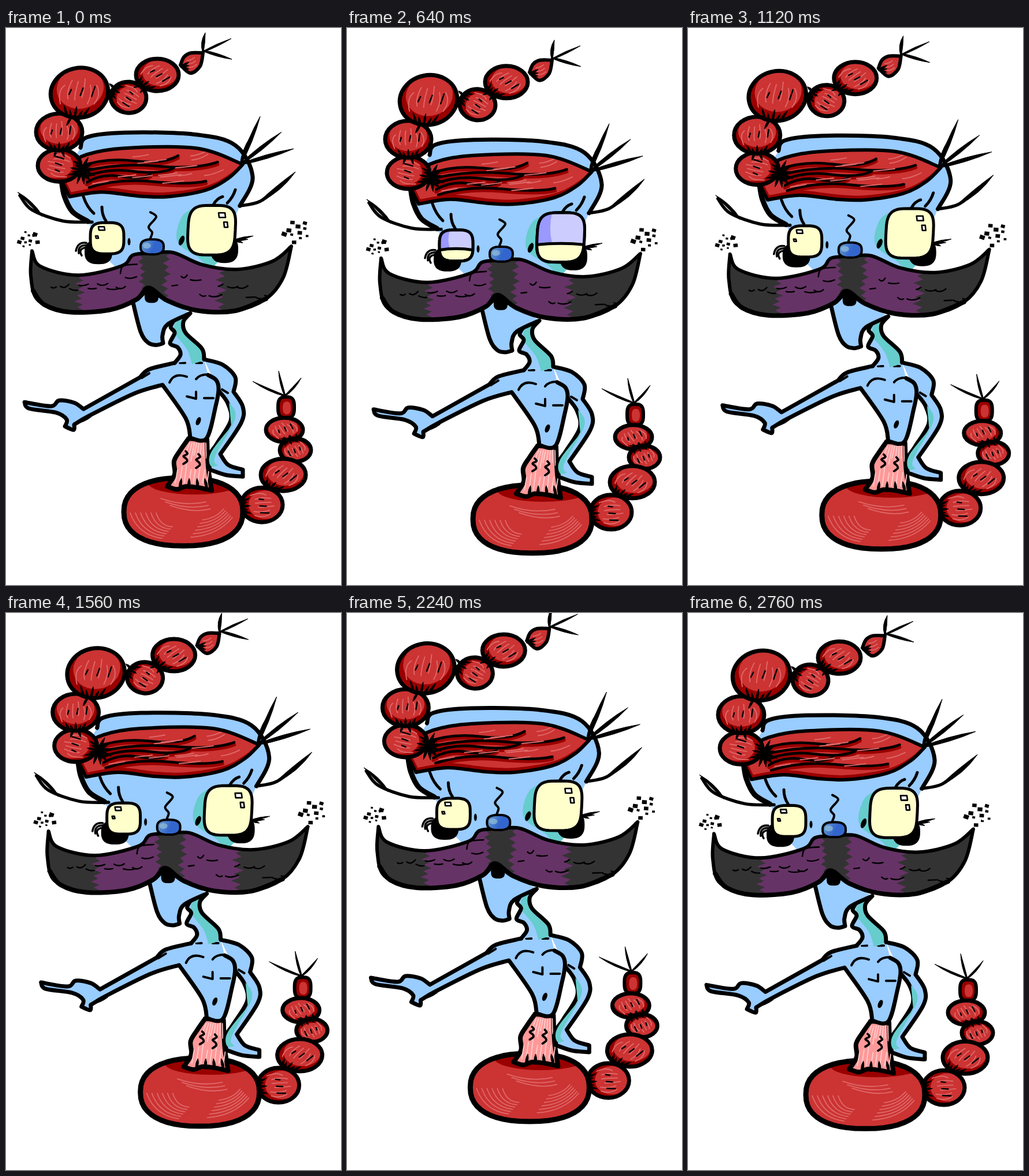
An HTML page that plays this animation: 580x965 px, repeating every 2.8 s.

```html
<!DOCTYPE html>
<html lang="en">
<head>
<meta charset="utf-8">
<title>Floating moustache</title>
<style>
html, body { margin: 0; width: 100%; height: 100%; overflow: hidden; background: #fff; }
svg { display: block; width: 580px; height: 965px; }
</style>
</head>
<body>
<svg viewBox="0 0 580 965">
  <defs id="defs">
    <linearGradient id="noseFill" x1="0" x2="1" y1="0" y2=".3">
      <stop offset=".1" stop-color="#6699cc"/><stop offset=".65" stop-color="#3366cc"/>
    </linearGradient>
  </defs>
  <g id="all"></g>
</svg>
<script>
const NS = "http://www.w3.org/2000/svg";
const all = document.getElementById("all"), defs = document.getElementById("defs");
let layer = all;

const RED = "#cc3333", DARK = "#990000", GLOSS = "#df6868", SKY = "#99ccff",
      TEAL = "#66cccc", CREAM = "#ffffcc", PLUM = "#663366", COAL = "#333333";

let seed = 7;
const rand = (lo, hi) => lo + (hi - lo) * ((seed = seed * 16807 % 2147483647) / 2147483647);
const times = (n, fn) => { for (let i = 0; i < n; i++) fn(i, n > 1 ? i / (n - 1) : 0); };

function node(name, attrs, parent = layer) {
  const n = document.createElementNS(NS, name);
  for (const k in attrs) n.setAttribute(k, attrs[k]);
  return parent.appendChild(n);
}

function group(attrs, fn) {
  const up = layer, g = layer = node("g", attrs);
  fn();
  layer = up;
  return g;
}

function clipTo(d, id, fn) {
  node("path", { d }, node("clipPath", { id }, defs));
  group({ "clip-path": `url(#${id})` }, fn);
}

// Spline through points; "/" makes a corner at the point before it.
function spline(text) {
  let d = "", last = null;
  for (const part of text.split("/")) {
    const p = part.trim().split(/\s+/).map(s => s.split(",").map(Number));
    if (last) p.unshift(last); else d = "M" + p[0];
    for (let i = 0; i < p.length - 1; i++) {
      const a = p[i - 1] || p[i], b = p[i], c = p[i + 1], e = p[i + 2] || c;
      d += `C${b[0] + (c[0] - a[0]) / 6},${b[1] + (c[1] - a[1]) / 6} ` +
           `${c[0] - (e[0] - b[0]) / 6},${c[1] - (e[1] - b[1]) / 6} ${c}`;
    }
    last = p[p.length - 1];
  }
  return d;
}

// Rounded box between an ellipse (n = 2) and a rectangle.
function blob(cx, cy, rx, ry, n, lean = 0) {
  const p = [], pow = v => Math.sign(v) * Math.abs(v) ** (2 / n);
  times(48, i => {
    const a = i * Math.PI / 24, y = ry * pow(Math.sin(a));
    p.push([cx + rx * pow(Math.cos(a)) - lean * y, cy + y]);
  });
  return "M" + p.join("L") + "Z";
}

function path(d, fill, width = 0, stroke = "#000") {
  return node("path", { d, fill, stroke, "stroke-width": width,
    "stroke-linecap": "round", "stroke-linejoin": "round" });
}
const shape = (text, fill, width) => path(spline(text), fill, width);
const line = (text, width = 4, color) => path(spline(text), "none", width, color);

function spike(x0, y0, x1, y1, w, bend = 0) {
  const l = Math.hypot(x1 - x0, y1 - y0), nx = (y1 - y0) / l, ny = (x0 - x1) / l;
  const mid = k => [(x0 + x1) / 2 + nx * k, (y0 + y1) / 2 + ny * k];
  path(`M${x0 + nx},${y0 + ny}Q${mid(bend + w)} ${x1},${y1}Q${mid(bend - w)} ${x0 - nx},${y0 - ny}Z`, "#000", 1);
}

function squiggle(x, y, h, amp) {
  const p = [];
  times(6, (i, u) => p.push(`${x + amp * Math.sin(i * 2.2)},${y + h * u}`));
  line(p.join(" "), 3.8);
}

// A bead drawn on the unit disk: a runs toward the knot, b across it.
function bead(cx, cy, rx, ry, knot, tilt = 0) {
  const c = Math.cos(knot * Math.PI / 180), s = Math.sin(knot * Math.PI / 180);
  const at = (a, b) => [rx * (a * c - b * s), ry * (a * s + b * c)];
  group({ transform: `translate(${cx} ${cy}) rotate(${tilt})` }, () => {
    node("ellipse", { rx, ry, fill: DARK });
    const [ox, oy] = at(-.18, 0);
    node("ellipse", { cx: ox, cy: oy, rx: rx * .82, ry: ry * .82, fill: RED });
    times(6, (i, u) => {
      const b = u * 1.3 - .65, far = -.62 + Math.abs(b) * .4 + (i % 2) * .12;
      path(`M${at(far, b * .85)}Q${at(0, b * 1.2)} ${at(far + .75, b * .9)}`, "none", 1.9, GLOSS);
    });
    times(3, i => path(`M${at(-.3 + i * .1, i * .4 - .5)}L${at(.1, i * .4 - .45)}`, "none", 2.4));
    node("ellipse", { rx, ry, fill: "none", stroke: "#000", "stroke-width": 7 });
    times(5, (i, u) => {
      const b = u - .5;
      spike(...at(1, b * .5), ...at(.55 + .15 * (i % 2), b * .9), 3);
      if (i % 2) spike(...at(1, b * .5), ...at(1.35, b * .9), 3);
    });
  });
}

function tail() {
  path(blob(485, 657, 14, 18, 3), DARK, 6);
  path(blob(486, 658, 7, 11, 2.5), RED);
  bead(482, 696, 32, 21, 65);
  bead(501, 731, 27, 20, -115);
  bead(480, 774, 39, 28, 125);
  bead(443, 826, 36, 30, 175);
  for (const [x, y, bend] of [[472, 594, 2], [427, 612, 3], [511, 606, -3]]) spike(483, 637, x, y, 3, bend);
}

function base() {
  const body = blob(307, 838, 103, 59, 2.35);
  path(body, RED);
  clipTo(body, "baseClip", () => {
    node("ellipse", { cx: 326, cy: 788, rx: 80, ry: 20, fill: DARK });
    times(6, (i, u) => {
      const r = 92 - 9 * i, top = 815 + 6 * i;
      path(`M${307 - r},${840}q${r * .15},${38 - i * 3} ${r * .6},${44 - i * 4}`, "none", 1.8, GLOSS);
      path(`M${320 + i * 4},${882 - i * 6}q${r * .5},-3 ${r * .78},${-34 + i * 3}`, "none", 1.8, GLOSS);
      if (i < 3) path(`M${268 + i * 8},${top}q40,14 ${78 - i * 4},6`, "none", 1.8, GLOSS);
    });
  });
  path(body, "none", 9);
}

function waist() {
  shape("316,711 / 348,713 / 350,760 356,801 / 333,796 311,794 296,799 279,794 / 292,773 291,750 302,731 316,711", "#ff9999", 8);
  times(8, (i, u) => {
    const x = 318 + 28 * u, foot = 293 + 55 * u;
    path(`M${x},719L${x + (foot - x) * .35},${740 + i % 3 * 5}`, "none", 1.8, "#ffcccc");
    path(`M${foot + 4},${765 - i % 3 * 5}L${foot},788`, "none", 1.8, "#ffcccc");
    if (i % 2) spike(foot, 798, foot + 4 - 8 * u, 780, 4);
  });
  squiggle(311, 733, 22, 4);
  squiggle(333, 738, 24, 4);
}

function torso() {
  shape("343,574 375,583 397,605 394,630 / 410,656 407,684 371,738 / 385,757 410,765 / 410,777 / 380,774 353,765 / 351,742 365,720 389,680 384,650 368,628", SKY, 7);
  shape("386,648 397,676 362,742 367,758 / 354,758 355,735 390,690", TEAL);

  const front = "292,580 248,591 232,605 / 134,660 / 118,649 92,645 78,655 32,648 / 40,659 86,666 105,678 102,690 / 117,696 118,687 / 145,671 222,633 271,618 / 311,676 319,710 / 347,711 363,655 368,626 364,610 350,601";
  shape(front + " / 343,574", SKY);
  line(front, 7);
  for (const d of ["M248,598l-13,8", "M118,685q16,-3 28,-12", "M283,614q8,-18 30,-10", "M329,608q6,-8 20,-8",
    "M313,638l16,4v-12", "M343,641h16", "M301,580h9", "M329,580h10", "M374,626l10,6"]) path(d, "none", 4);
  path(blob(333, 681, 3, 6, 2, .3), "#000", 2);
}

function neck() {
  const left = "292,580 302,566 297,553 284,546 292,528 285,518 291,506 /", right = "318,495 307,509 311,528 339,555 343,574";
  shape(left + right, SKY);
  shape("292,512 307,503 309,527 336,556 341,574 322,582 / 313,556 290,528", TEAL);
  line(left.slice(0, -2), 7);
  line(right, 7);
}

function head() {
  const rim = "129,207 140,189 205,181 325,184 397,203 427,258 405,308";
  shape("129,207 140,189 205,181 325,184 397,203 427,258 405,308 / 353,424 / 230,438 180,405 / 142,336 / 115,318 96,264", SKY);
  line(rim, 7);
  line("96,264 101,291 115,318 142,335", 9);
  shape("335,308 305,326 297,370 337,401 350,424 / 367,405", TEAL);

  const soup = spline("96,264 105,240 140,219 205,208 330,208 410,236 / 385,260 345,281 280,292 230,291 165,284 110,292 / 96,264");
  path(soup, DARK);
  clipTo(soup, "soupClip", () => {
    group({ transform: "translate(3 -8)" }, () => path(soup, RED));
    times(5, i => {
      const x = 128 + i * 4, y = 232 + i * 9, w = 170 + 65 * Math.sin(i * 1.7);
      const wave = `M${x},${y + 8}q${w * .25},-16 ${w * .55},-10t${w * .45},${-9 + i * 2}`;
      group({ transform: "translate(0 4)" }, () => path(wave, "none", 6, DARK));
      path(wave, "none", 4.5);
    });
    times(14, i => {
      const x = rand(150, 360), y = rand(214, 274);
      path(`M${x},${y}q14,-1 ${rand(22, 38)},${x > 300 ? -10 : -4}`, "none", 1.9, GLOSS);
    });
  });
  path(soup, "none", 6);

  for (const [x, y] of [[440, 153], [477, 180], [498, 209], [422, 190]]) spike(406, 236, x, y, 6);
  line("24,290 45,315 98,334 149,336", 5.5);
  spike(62, 325, 20, 284, 5, -3);
  line("404,308 440,300 478,271", 5.5);
  spike(440, 300, 501, 249, 7, -4);
}

function face() {
  path(blob(160, 388, 24, 21, 2.6), "#000");
  path(blob(378, 383, 24, 24, 2.6), "#000");
  times(3, i => {
    path(`M139,${372 + i * 4}q-15,${-2 + i * 2} ${-18 + i * 5},14`, "none", 3.5);
    spike(396, 367, 428 - i * 9, 360 + i * 6, 3);
  });
  for (const d of ["M134,292q6,18 18,29", "M166,310q0,14 7,24", "M383,303q10,-10 14,-23", "M359,306q6,-11 16,-14"])
    path(d, "none", 5);
  line("250,319 260,327 247,344 253,354 250,364", 4);
  path(blob(213, 370, 2, 6, 2), "#000", 1);
  path(blob(304, 368, 4, 8, 2, .3), "#000", 1);
}

const pupil = (x, y, w, h) => path(`M${x},${y}h${w}l1,${h}h${-w}z`, "#fff", 2.6);

function eyes() {
  const left = blob(175, 364, 29, 27, 3.4), right = blob(356, 350, 41, 43, 3.6, .05);
  const lid = (eye, id, x, y, w, h) => {
    clipTo(eye, id, () => {
      node("rect", { x, y, width: w, height: h, fill: "#ccccff" });
      path(`M${x},${y}h${w * .34}q-8,${h / 2} 0,${h}h${-w * .34}z`, "#9999ff");
      path(`M${x},${y + h}q${w / 2},-5 ${w},0`, "none", 5);
    });
    path(eye, "none", 5);
  };
  path(left, CREAM, 5);
  path(right, CREAM, 5);
  pupil(160, 344, 10, 6);
  pupil(155, 360, 4, 4);
  pupil(368, 320, 11, 8);
  pupil(377, 336, 6, 9);
  return group({}, () => {
    lid(left, "lidL", 145, 335, 60, 37);
    lid(right, "lidR", 312, 304, 88, 59);
  });
}

function zigzag(x, y0, y1, lean, amp) {
  const p = [];
  times(15, (i, u) => p.push([x + lean * u + (i % 2 ? amp : -amp) * (1 + .5 * Math.sin(i * 2)), y0 + (y1 - y0) * u]));
  return p;
}

function moustache() {
  shape("218,475 233,526 246,545 260,549 272,546 / 271,532 280,513 319,494 / 247,450", SKY);
  line("220,476 233,526 246,545 260,549 272,546 / 271,532 280,513 319,494", 7);
  path(blob(252, 464, 12, 12, 3), "#000");

  const bottom = "247,450 / 226,470 180,488 111,492 56,472 43,430 45,386";
  const hair = spline(bottom + " / 60,413 125,428 200,412 220,393 254,390 290,389 340,410 400,418 461,404 494,378 / 480,432 450,469 395,490 330,489 279,472 247,450");
  path(hair, PLUM);
  clipTo(hair, "hairClip", () => {
    const zone = pts => path("M" + pts.join("L") + "Z", COAL);
    zone([[20, 370], ...zigzag(130, 422, 494, -4, 6), [20, 500]]);
    zone([[520, 360], ...zigzag(374, 412, 496, -4, 7), [520, 500]]);
    zone([...zigzag(233, 382, 462, 4, 4), ...zigzag(281, 382, 470, -7, 5).reverse()]);
    times(24, (i, u) => {
      const x = 78 + 370 * u, far = Math.abs(x - 250), w = rand(8, 24);
      if (far > 35) path(`M${x},${426 + 30 * Math.sin(far / 95) + rand(-14, 14)}q${w / 2},${rand(-1, 6)} ${w},${rand(-4, 3)}`, "none", 2.4);
    });
  });
  path(hair, "none", 6);
  line("47,455 66,479 111,492 180,488 226,470 247,450 279,472 330,489 395,490 450,469", 8);
  line("198,425 203,412 227,409", 2.6);

  path(blob(253, 379, 20, 13, 2.7), "url(#noseFill)", 4);
  node("ellipse", { cx: 244, cy: 377, rx: 7, ry: 5, fill: "#99c5dd", opacity: .65 });
}

function topChain() {
  shape("302,64 308,50 320,43 341,43 / 336,66 319,78 302,64", RED, 6);
  times(3, i => path(`M${313 + i * 2},${56 + i * 6}q8,0 13,-5`, "none", 1.8, GLOSS));
  times(3, i => spike(302, 67, 317, 59 + i * 6, 3));
  bead(212, 120, 31, 27, 205, 5);
  bead(262, 81, 37, 28, 135);
  bead(92, 238, 37, 28, 15);
  bead(92, 180, 40, 32, 90);
  bead(127, 112, 50, 43, 110, -12);
  times(7, i => {
    const a = -1.1 + i * .5;
    spike(131, 246, 131 + 25 * Math.cos(a), 246 + 25 * Math.sin(a), 4);
  });
  spike(341, 41, 345, 8, 5, 3);
  spike(341, 41, 390, 18, 3);
  spike(341, 39, 391, 54, 4);
}

function sparks(cx, cy, r, size) {
  times(11, i => {
    const a = i * 2.4, d = r * Math.sqrt((i + .5) / 11), s = size * rand(.4, 1);
    node("rect", { x: cx + d * Math.cos(a), y: cy + d * Math.sin(a), width: s, height: s * .8,
      transform: `rotate(${rand(-8, 20)} ${cx} ${cy})` });
  });
}

tail();
base();
waist();
torso();
neck();
head();
face();
const lids = eyes();
moustache();
topChain();
sparks(36, 365, 17, 8);
sparks(500, 351, 23, 9);

const LOOP = 2800, STEP = 40, TURN = 2 * Math.PI;

// The figure drifts around a circle; its rise runs slightly slower than its sway.
function draw(now) {
  const t = Math.floor(now % LOOP / STEP) * STEP;
  const x = 15 - 15 * Math.cos(TURN * t / LOOP + .07);
  const y = 14.8 * Math.sin(TURN * t / 2880 + .15) - 2;
  all.setAttribute("transform", `translate(${x.toFixed(2)} ${y.toFixed(2)})`);
  lids.setAttribute("visibility", t >= 600 && t < 720 ? "visible" : "hidden");
}

let start = null;
function tick(now) {
  if (start === null) start = now;
  draw(Math.max(0, now - start));
  requestAnimationFrame(tick);
}
draw(0);
requestAnimationFrame(tick);
</script>
</body>
</html>
```
